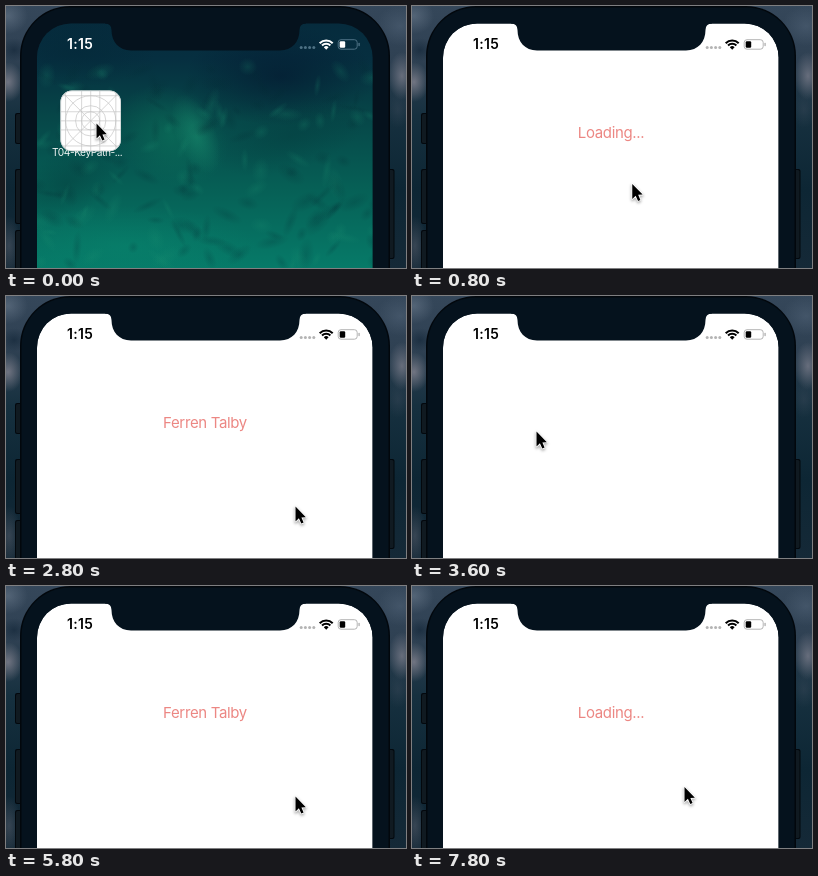
An HTML page with a canvas that plays this animation: 400 px wide and 262 px high, repeating every 8000 ms.

```html
<!DOCTYPE html>
<html lang="en">
<head>
<meta charset="utf-8">
<title>App launch</title>
<style>
html, body { margin: 0; width: 100%; height: 100%; overflow: hidden; background: #172c3b; }
canvas { display: block; width: 400px; height: 262px; }
</style>
</head>
<body>
<canvas id="stage" width="400" height="262"></canvas>
<script>
const W = 400, H = 262, LOOP = 8000, STEP = 200;
const ctx = document.getElementById('stage').getContext('2d');

// Each launch: home, zooming icon, blank screen, loading text, then the name.
const PERIOD = 3350, LEAD = 180;
const OPENED = 240, LOADING = 650, LOADED = 1900;
const SCREEN = { x: 31, y: 17.4, w: 335.6, h: 728, r: 34 };
const ICON = { x: 82, y: 108.5, size: 54, r: 11 };

// Pointer path within one launch: time, x, y.
const POINTER = [
  [-150, 85, 114], [0, 90.5, 117.5], [200, 115.5, 133],
  [250, 124.5, 135.5], [1100, 272.5, 201], [1250, 289.5, 210.5]
];

const mix = (a, b, k) => a + (b - a) * k;
const clamp = k => Math.min(1, Math.max(0, k));

function pointerAt(t) {
  let i = 1;
  while (i < POINTER.length - 1 && POINTER[i][0] < t) i++;
  const [t0, x0, y0] = POINTER[i - 1], [t1, x1, y1] = POINTER[i];
  const k = clamp((t - t0) / (t1 - t0));
  return [mix(x0, x1, k), mix(y0, y1, k)];
}

// Critically damped spring, 0 = icon, 1 = full screen
function openness(t) {
  const s = Math.max(0, t + 6) * .0388;
  return 1 - (1 + s) * Math.exp(-s);
}

function roundRect(x, y, w, h, r, fill) {
  ctx.beginPath();
  ctx.roundRect(x, y, w, h, r);
  if (fill) {
    ctx.fillStyle = fill;
    ctx.fill();
  }
}

function vertical(stops) {
  const g = ctx.createLinearGradient(0, 0, 0, H);
  stops.forEach(([at, color]) => g.addColorStop(at, color));
  ctx.fillStyle = g;
  ctx.fillRect(0, 0, W, H);
}

function glow(x, y, rx, ry, rgb, alpha, turn = 0) {
  ctx.save();
  ctx.translate(x, y);
  ctx.rotate(turn);
  ctx.scale(rx, ry);
  const g = ctx.createRadialGradient(0, 0, 0, 0, 0, 1);
  g.addColorStop(0, `rgba(${rgb},${alpha})`);
  g.addColorStop(1, `rgba(${rgb},0)`);
  ctx.fillStyle = g;
  ctx.fillRect(-1, -1, 2, 2);
  ctx.restore();
}

function text(str, x, y, font, color, spacing = 0, align = 'center') {
  ctx.font = `${font} Inter, Roboto, sans-serif`;
  ctx.letterSpacing = spacing + 'px';
  ctx.textAlign = align;
  ctx.fillStyle = color;
  ctx.fillText(str, x, y);
}

function seeded(seed) {
  return () => (seed = (seed * 16807) % 2147483647) / 2147483647;
}

function drawClouds() {
  vertical([[0, '#35475a'], [.2, '#2f4153'], [.42, '#16303f'], [.7, '#0d2634'], [1, '#152937']]);
  glow(2, 10, 20, 18, '104,120,138', .6);
  glow(2, 76, 15, 20, '138,136,148', .75);
  glow(8, 44, 14, 12, '16,36,54', .6);
  glow(3, 240, 12, 30, '92,98,112', .5);
  glow(394, 20, 24, 20, '78,96,116', .6);
  glow(396, 70, 14, 24, '124,126,140', .75);
  glow(392, 104, 12, 18, '60,74,90', .4);
}

function drawBody() {
  const side = '#101a21', edge = '#03080d';
  for (const [x, y, h] of [[9, 107, 31], [9, 163, 55], [9, 224, 50], [381, 163, 90]]) {
    roundRect(x, y, 7.5, h, 2, edge);
    roundRect(x + 1, y + 1, 5.5, h - 2, 1.5, side);
  }
  roundRect(14, 0, 370, 330, 50, '#02070c');
  roundRect(15.5, 1.5, 367, 330, 48, '#05121d');
}

function drawWallpaper() {
  vertical([[0, '#06293b'], [.2, '#062f40'], [.42, '#064648'], [.7, '#066056'], [1, '#067a68']]);
  glow(275, 70, 95, 50, '4,28,50', .75);
  glow(70, 45, 80, 36, '4,40,56', .6);
  glow(165, 130, 60, 48, '12,118,92', .6, .5);
  glow(190, 128, 20, 42, '28,150,116', .5, -.4);
  glow(60, 178, 60, 32, '4,62,62', .5, -.4);
  glow(285, 130, 80, 34, '4,62,64', .5, -.3);
  glow(120, 240, 130, 40, '8,134,110', .5);
  // Smoke, drawn as small puffs
  const rnd = seeded(73);
  for (let i = 0; i < 160; i++) {
    const x = 30 + rnd() * 340, y = 60 + rnd() * 200;
    const rgb = rnd() > .5 ? '28,146,114' : '2,42,50';
    glow(x, y, 5 + rnd() * 13, 3 + rnd() * 6, rgb, .2, rnd() * 3);
  }
}

function drawGrid(r) {
  ctx.strokeStyle = '#c2c2c2';
  ctx.lineWidth = .7;
  ctx.beginPath();
  for (const k of [-.83, -.3, 0, .3, .83]) {
    ctx.moveTo(k * r, -r);
    ctx.lineTo(k * r, r);
    ctx.moveTo(-r, k * r);
    ctx.lineTo(r, k * r);
  }
  for (const k of [-1, 1]) {
    ctx.moveTo(-r, -r * k);
    ctx.lineTo(r, r * k);
  }
  for (const k of [.3, .5, .83]) {
    ctx.moveTo(k * r, 0);
    ctx.arc(0, 0, k * r, 0, Math.PI * 2);
  }
  ctx.stroke();
}

// The icon grows into the app window.
function drawWindow(p) {
  const w = mix(ICON.size, SCREEN.w, p);
  const h = w * (1 + (SCREEN.h / SCREEN.w - 1) * p * p);
  const r = mix(ICON.r, SCREEN.r, p);
  ctx.save();
  ctx.translate(mix(ICON.x, SCREEN.x + SCREEN.w / 2, p), mix(ICON.y, SCREEN.y + SCREEN.h / 2, p));
  roundRect(-w / 2, -h / 2, w, h, r, '#fff');
  ctx.clip();
  ctx.globalAlpha = clamp(1 - p * 2);
  drawGrid(w / 2);
  roundRect(-w / 2, -h / 2, w, h, r);
  ctx.strokeStyle = '#c3cbcb';
  ctx.lineWidth = 1.4;
  ctx.stroke();
  ctx.restore();
}

function drawNotch() {
  ctx.beginPath();
  ctx.moveTo(99, 10);
  ctx.lineTo(99, 17.4);
  ctx.quadraticCurveTo(105.5, 17.4, 105.5, 24);
  ctx.bezierCurveTo(105.5, 36, 113, 44.4, 125, 44.4);
  ctx.lineTo(274, 44.4);
  ctx.bezierCurveTo(286, 44.4, 293.5, 36, 293.5, 24);
  ctx.quadraticCurveTo(293.5, 17.4, 300, 17.4);
  ctx.lineTo(300, 10);
  ctx.fillStyle = '#05121d';
  ctx.fill();
}

function drawStatus(ink, faint) {
  text('1:15', 74, 43, '600 14px', ink, .3);
  ctx.fillStyle = faint;
  for (let i = 0; i < 4; i++) {
    ctx.beginPath();
    ctx.arc(295.2 + i * 4.2, 41.6, 1.5, 0, 7);
    ctx.fill();
  }
  // Wi-Fi fan
  const cx = 320.2, cy = 43.7, a = -Math.PI * .75, b = -Math.PI * .25;
  ctx.strokeStyle = ctx.fillStyle = ink;
  ctx.lineWidth = 2;
  for (const r of [9.2, 5.9]) {
    ctx.beginPath();
    ctx.arc(cx, cy, r, a, b);
    ctx.stroke();
  }
  ctx.beginPath();
  ctx.moveTo(cx, cy);
  ctx.arc(cx, cy, 3.4, a, b);
  ctx.fill();
  // Battery
  roundRect(332.2, 33.7, 19, 9.5, 2.8);
  ctx.strokeStyle = faint;
  ctx.lineWidth = 1;
  ctx.stroke();
  roundRect(333.7, 35.2, 5.5, 6.5, 1.2, ink);
  roundRect(352.4, 36.7, 1.4, 3.5, .7, faint);
}

function drawPointer(x, y) {
  const shape = [[0, 0], [0, 15], [3.4, 11.8], [5.8, 17], [8.1, 16], [5.9, 10.9], [10.4, 10.7]];
  ctx.save();
  ctx.translate(x, y);
  ctx.beginPath();
  shape.forEach(([px, py]) => ctx.lineTo(px, py));
  ctx.closePath();
  ctx.lineJoin = 'round';
  ctx.lineWidth = 1.6;
  ctx.strokeStyle = '#fff';
  ctx.shadowColor = 'rgba(0,0,0,.4)';
  ctx.shadowBlur = 3;
  ctx.shadowOffsetY = 1.5;
  ctx.stroke();
  ctx.shadowColor = 'transparent';
  ctx.fillStyle = '#000';
  ctx.fill();
  ctx.restore();
}

function drawScreen(t) {
  const p = t < OPENED ? openness(t) : 1;
  ctx.save();
  roundRect(SCREEN.x, SCREEN.y, SCREEN.w, SCREEN.h, SCREEN.r);
  ctx.clip();
  if (p < 1) {
    drawWallpaper();
    text('T04-KeyPath-...', 46, 150, '400 10.2px', '#f2f7f6', -.45, 'left');
  }
  drawWindow(p);
  if (t >= LOADING) {
    text(t < LOADED ? 'Loading...' : 'Ferren Talby', 199, 132.4, '400 15px', '#ec8783', -.35);
  }
  ctx.restore();
  drawNotch();
  const home = p < .5;
  drawStatus(home ? '#fff' : '#000', home ? '#4d7184' : '#b4b4b4');
}

function draw(time) {
  const now = Math.floor((time % LOOP) / STEP) * STEP;
  const t = (now + LEAD) % PERIOD - LEAD;
  drawClouds();
  drawBody();
  drawScreen(t);
  drawPointer(...pointerAt(t));
}

const begin = performance.now();
function tick() {
  draw(performance.now() - begin);
  requestAnimationFrame(tick);
}
tick();
</script>
</body>
</html>
```
